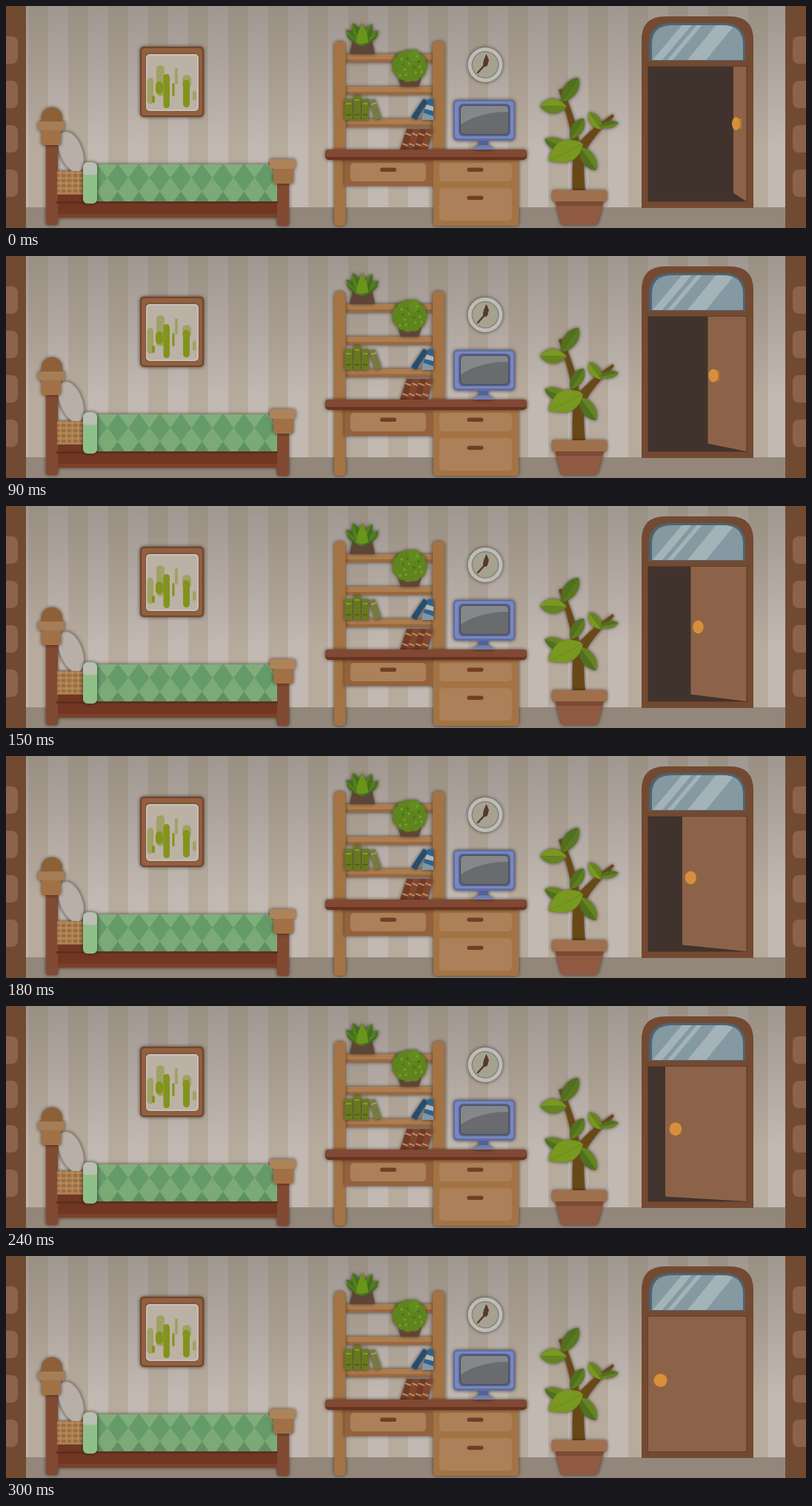
Write an HTML page that moves like this. It is 1080 px wide and 300 px high and loops after 0.75 s.

```html
<!DOCTYPE html>
<html lang="en">
<head>
<meta charset="utf-8">
<title>Room with a closing door</title>
<style>
html, body { margin: 0; width: 100%; height: 100%; overflow: hidden; background: #b3a79a; }
svg { display: block; width: 1080px; height: 300px; }
.lift { filter: drop-shadow(0 0 2.5px rgba(35, 25, 20, .75)); }
</style>
</head>
<body>
<svg id="stage" viewBox="0 0 1080 300"></svg>
<script>
const stage = document.getElementById('stage');

// Shape helpers: rectangles are given by their edges.
const box = (l, t, r, b, fill, radius = 0, extra = '') =>
  `<rect x="${l}" y="${t}" width="${r - l}" height="${b - t}" rx="${radius}" fill="${fill}" ${extra}/>`;
const path = (d, fill, extra = '') => `<path d="${d}" fill="${fill}" ${extra}/>`;
const line = (d, color, width, extra = '') =>
  `<path d="${d}" fill="none" stroke="${color}" stroke-width="${width}" ${extra}/>`;
const dot = (x, y, r, fill, extra = '') => `<circle cx="${x}" cy="${y}" r="${r}" fill="${fill}" ${extra}/>`;
const lift = (...parts) => `<g class="lift">${parts.join('')}</g>`;
const repeat = (n, make) => Array.from({ length: n }, (_, i) => make(i)).join('');

function leaf(x1, y1, x2, y2, bulge, near, far) {
  const side = k => {
    const nx = -(y2 - y1) * bulge * k, ny = (x2 - x1) * bulge * k;
    const at = f => `${x1 + (x2 - x1) * f + nx} ${y1 + (y2 - y1) * f + ny}`;
    return `M${x1} ${y1}C${at(.3)} ${at(.75)} ${x2} ${y2}Z`;
  };
  return path(side(1), near) + path(side(-1), far);
}

const defs = `<defs>
  <linearGradient id="shade" x2="0" y2="1">
    <stop offset="0" stop-color="#60584e" stop-opacity=".34"/>
    <stop offset=".3" stop-color="#60584e" stop-opacity=".2"/>
    <stop offset=".7" stop-color="#60584e" stop-opacity="0"/>
  </linearGradient>
  <clipPath id="blanket"><rect x="120" y="214" width="246" height="51"/></clipPath>
  <clipPath id="glass"><path d="M872 73V52Q872 26 899 26H968Q995 26 995 52V73Z"/></clipPath>
  <clipPath id="screen"><rect x="614" y="135" width="64" height="38" rx="5"/></clipPath>
</defs>`;

function wall() {
  return box(0, 0, 1080, 300, '#c1b9b2')
    + repeat(20, i => box(30 + i * 54, 0, 57 + i * 54, 272, '#b7ab9e'))
    + box(0, 0, 1080, 272, 'url(#shade)')
    + box(0, 272, 1080, 300, '#93877b');
}

function sideColumns() {
  const notches = (l, r) => repeat(4, i => box(l, 41 + i * 60, r, 78 + i * 60, '#8d624a', 8));
  return box(0, 0, 27, 300, '#714a32') + notches(-14, 16)
    + box(1052, 0, 1080, 300, '#714a32') + notches(1062, 1094);
}

function painting() {
  const stem = (l, t, r, b, color) => box(l, t, r, b, color, (r - l) / 2);
  const pale = '#a1a165', green = '#82941c';
  return lift(box(181, 55, 267, 150, '#71442c', 5), box(183, 57, 265, 148, '#91603f', 4))
    + box(188, 63, 261, 143, '#80543b', 6) + box(189, 65, 260, 142, '#c9c0b8', 5)
    + box(191, 67, 258, 140, '#bcb1a5', 4)
    + stem(190.5, 97, 199, 132, pale) + stem(203, 80, 214, 122, pale)
    + stem(228, 84, 232, 106, pale) + stem(238, 93, 250, 112, pale)
    + stem(252, 115, 256.5, 128, pale)
    + stem(202, 102, 212, 119, green) + stem(212.5, 92, 221, 138, green)
    + stem(224.5, 104, 227.5, 122, green) + stem(239, 100, 248, 137, green)
    + stem(197, 121, 201, 131, green);
}

function bed() {
  const diamond = (x, y, color) => path(`M${x} ${y - 19}l14.2 19l-14.2 19l-14.2 -19Z`, color);
  const weave = repeat(5, i => box(69, 224 + i * 7, 105, 227 + i * 7, '#bd9664', 0, 'opacity=".55"'))
    + repeat(5, i => box(72 + i * 8, 223, 75 + i * 8, 253, '#bd9664', 0, 'opacity=".5"'));
  const quilt = box(120, 214, 366, 265, '#80ae7b')
    + repeat(10, i => diamond(122.5 + i * 28.4, 232, '#659a69'))
    + repeat(10, i => diamond(108.3 + i * 28.4, 251, '#7baa77'))
    + repeat(10, i => diamond(122.5 + i * 28.4, 270, '#5d9063'));
  return lift(
    box(68, 250, 368, 286, '#723722'),
    box(54, 183, 70, 296, '#814a32', 3), box(366, 232, 382, 297, '#814a32', 3),
    `<ellipse cx="88" cy="197" rx="15" ry="28.5" fill="#b8afa8" stroke="#9e958d" transform="rotate(-20 88 197)"/>`,
    box(69, 223, 106, 254, '#9b6d40'), weave,
    `<g clip-path="url(#blanket)">${quilt}</g>`)
    + box(68, 264, 367, 267, '#5e2f1d') + box(70, 281, 366, 286, '#7c4029')
    + lift(box(48, 137, 76, 176, '#8d6037', 14), box(48, 164, 74, 188, '#a17145', 3),
      box(43, 156, 80, 168, '#a57d57', 3))
    + lift(box(361, 216, 388, 240, '#a17145', 3), box(356, 207, 391, 220, '#ad835a', 3))
    + lift(box(104, 211, 123, 267, '#8fbf89', 6),
      path('M104 227V219Q104 211 113 211Q123 211 123 219V227Q113 230 104 227Z', '#b9bfb2'));
}

function shelfItems() {
  const spikes = [[459, 32], [503, 33], [468, 23], [494, 24]];
  const succulent = path('M468 47H494L498 65H464Z', '#5d4537')
    + spikes.map(([x, y]) => leaf(481, 54, x, y, .2, '#426e1b', '#547f1e')).join('')
    + leaf(473, 49, 460, 38, .22, '#547f1e', '#426e1b') + leaf(489, 49, 502, 38, .22, '#426e1b', '#547f1e')
    + path('M473 49Q474 35 481 23Q488 35 489 49Q481 53 473 49Z', '#69951b');
  const crown = repeat(11, i => {
    const a = i * Math.PI * 2 / 11;
    return dot(545 + 15 * Math.cos(a), 81 + 13 * Math.sin(a), 9, '#5e841e');
  });
  const speckle = repeat(14, i => dot(527 + i * 17 % 36, 67 + i * 11 % 29, 1.7, i % 3 ? '#79a024' : '#49701b'));
  const bush = path('M529 96H561L557 109H533Z', '#614538') + dot(545, 82, 18, '#5e841e')
    + crown + dot(551, 67, 8, '#638b20') + speckle;
  const green = (l, t, r) => box(l, t, r, 154, '#68781e', 1)
    + box(l + 2, t + 5, r - 2, t + 7, '#8b9940') + box(l + 2, 146, r - 2, 148, '#4f6019');
  const greenBooks = green(457, 126, 468) + green(469, 121, 479) + green(480, 126, 490)
    + path('M490 128L498 126L507 151L498 154Z', '#737c3d') + line('M493 133l7 -2', '#99a056', 2);
  const blueBooks = path('M564 125L569 129L554 154L547 150Z', '#244d70')
    + path('M570 126H577V154H561Z', '#2c638f') + path('M568 133L577 136V142L565 139Z', '#afb6b7')
    + path('M563 144L577 149V154H561Z', '#8197a3');
  const brownBooks = repeat(4, i => {
    const x = 532 + i * 9;
    return path(`M${x + 9} 166h8.5l-7 28h-10.5Z`, i % 2 ? '#81472c' : '#723b25')
      + line(`M${x + 7} 172l8 3M${x + 3} 186l8 3`, '#bb8863', 2);
  });
  return lift(succulent) + lift(bush) + lift(greenBooks) + lift(blueBooks) + lift(brownBooks);
}

function desk() {
  const wood = '#a47344', face = '#ac8058';
  const drawer = (l, t, r, b) => box(l, t, r, b, face, 5);
  const handle = (l, t) => box(l, t, l + 22, t + 5.5, '#703f25', 2.7);
  const plank = y => box(456, y, 579, y + 11, '#9a693e') + box(456, y, 579, y + 7, '#ac7d50');
  return lift(plank(65), plank(109), plank(152.5))
    + lift(box(443, 48, 458.5, 297, wood, 5), box(576, 48, 592, 205, wood, 5))
    + shelfItems()
    + lift(box(457, 204, 578, 243, '#94613d'), box(577, 204, 692, 297, wood, 4))
    + drawer(465, 212, 567, 237) + handle(505, 218.5)
    + drawer(585, 212, 683, 237) + handle(622.5, 218.5)
    + drawer(585, 246, 683, 290) + handle(622.5, 256.5)
    + lift(box(431, 194, 703, 208, '#69331f', 5), box(431, 194, 703, 204, '#814933', 4));
}

function clock() {
  return lift(dot(647, 79.5, 23.5, '#bebcb7')) + dot(647, 79.5, 18.5, '#858178')
    + dot(647, 79.5, 17, '#a5a290')
    + line('M647 79L637 90M647 79L648.5 68', '#573829', 2.5, 'stroke-linecap="round"')
    + path('M648.5 65L652 73L650 80L644 78L645 73Z', '#573829') + dot(647, 79, 3, '#573829');
}

function computer() {
  return lift(box(638, 178, 651, 192, '#526493'), path('M630 194Q633 188 645 188Q656 188 659 194Z', '#7180b0'),
    box(604, 127, 687, 182, '#606fa8', 5), box(606, 129, 685, 179, '#7987bd', 4))
    + box(611, 132, 681, 176, '#53618e', 6) + box(613, 134, 679, 174, '#4b4d53', 6)
    + `<g clip-path="url(#screen)">${box(614, 135, 678, 173, '#696b6f')}`
    + path('M614 135H678V143Q640 143 614 160Z', '#85878a') + '</g>';
}

function tree() {
  const bark = '#694817', light = '#78981f', mid = '#648420', dark = '#50701f';
  return lift(
    path('M765 252Q764 222 766 200Q764 163 746 113L751 112Q768 147 774 184Q788 168 819 146L821 149Q794 174 781 198Q779 220 782 252Z', bark),
    leaf(750, 130, 773, 97, .3, '#58791f', dark),
    leaf(757, 136, 721, 135, .36, light, mid),
    leaf(804, 167, 787, 144, .32, mid, light),
    leaf(801, 163, 827, 158, .24, mid, dark),
    leaf(762, 180, 780, 152, .32, '#5d7f20', dark),
    leaf(765, 196, 727, 180, .27, mid, dark),
    leaf(774, 190, 797, 222, .3, dark, mid),
    path('M732 209Q740 179 762 181Q774 181 779 187Q774 207 758 211Q746 212 732 209Z', light),
    line('M735 208Q756 198 777 187', '#678a1e', 1))
    + lift(path('M740 260H808L799 293Q798 296 794 296H754Q750 296 749 293Z', '#8f5a41'),
      box(737, 249, 811, 264, '#a06f4b', 3))
    + path('M742 264H807L805 270H743Z', '#7a4a34');
}

function doorway() {
  const arch = 'M868 74V52Q868 23 898 23H968Q998 23 998 52V74Z';
  return path('M858 273V46Q858 14 890 14H977Q1009 14 1009 46V273Z', '#734a31')
    + path(arch, '#4d6472')
    + `<g clip-path="url(#glass)">${box(868, 23, 998, 74, '#8599a2')}`
    + path('M915 23H928L885 74H872Z', '#a4b3b7') + path('M935 23H942L899 74H892Z', '#a4b3b7')
    + path('M961 23H986L944 74H919Z', '#a4b3b7') + '</g>'
    + box(866, 81, 1001, 265, '#603d29') + box(867, 82, 999.5, 264, '#40332d')
    + '<path id="door" fill="#8c6348"/><path id="stem" fill="#b8762f"/><ellipse id="knob" fill="#d88f3a"/>';
}

stage.innerHTML = defs + wall() + painting() + bed() + desk() + clock() + computer() + tree()
  + doorway() + sideColumns();

const [door, stem, knob] = ['door', 'stem', 'knob'].map(id => document.getElementById(id));
const LOOP = 750, STEP = 30, STEPS = 10, HINGE = 999.5;
const mix = (a, b, k) => a + (b - a) * k;

function setAttributes(el, values) {
  for (const name in values) el.setAttribute(name, values[name]);
}

function render(ms) {
  const k = Math.min(Math.floor(ms % LOOP / STEP), STEPS) / STEPS;
  const edge = mix(982, 867, k);
  const open = Math.sqrt(Math.max(0, 1 - ((HINGE - edge) / (HINGE - 867)) ** 2));
  door.setAttribute('d', `M${edge} 82H${HINGE}V264L${edge} ${264 - 11.5 * open}Z`);
  const x = mix(985.5, 883.5, k), y = mix(159, 168, k), rx = mix(5.5, 9, k);
  setAttributes(knob, { cx: x, cy: y, rx, ry: 9 });
  const reach = x + rx + 2 * (1 - k);
  stem.setAttribute('d', `M${x} ${y - 7}H${reach}V${y + 7}H${x}Z`);
  stem.setAttribute('opacity', k < .4 ? 1 : 0);
}

const start = performance.now();
function tick(now) {
  render(Math.max(0, now - start));
  requestAnimationFrame(tick);
}
render(0);
requestAnimationFrame(tick);
</script>
</body>
</html>
```
